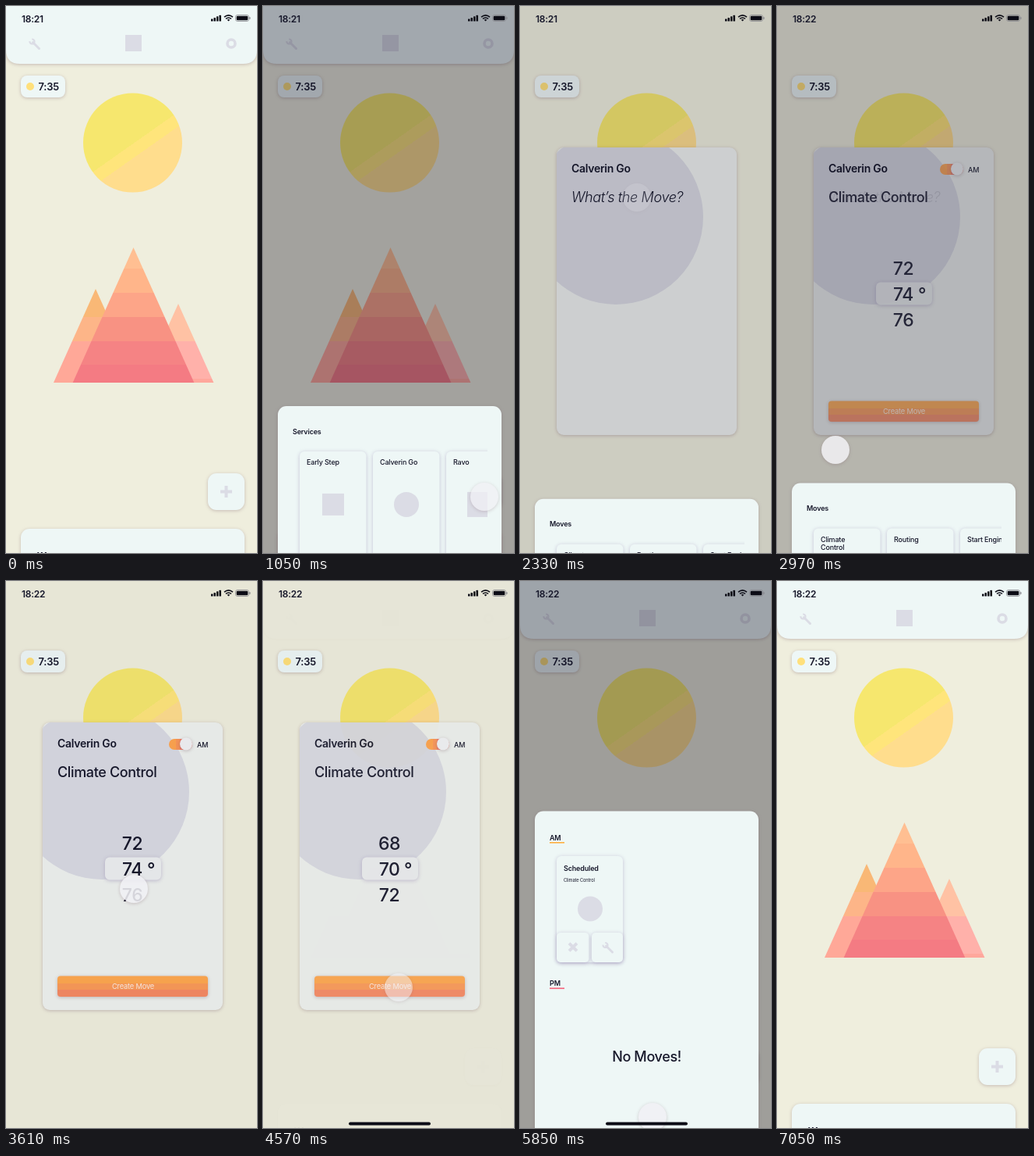
These frames come from a looping animation (322 px wide and 700 px high, 7130 ms). An HTML page:

```html
<!DOCTYPE html>
<html lang="en">
<head>
<meta charset="utf-8">
<title>Climate scheduling</title>
<style>
  html, body { margin: 0; width: 100%; height: 100%; overflow: hidden; background: #efeedd; }
  svg { display: block; width: 100vw; height: 100vh; }
  text { font-family: Inter, Roboto, sans-serif; letter-spacing: -.02em; fill: #16172a; }
  .panel { fill: #eef7f6; filter: drop-shadow(0 1.5px 2px rgba(120, 90, 100, .35)); }
  .tile { fill: #eef7f6; filter: drop-shadow(0 1px 2.5px rgba(140, 125, 170, .45)); }
  .mark { fill: #dbdce5; }
  .line { fill: none; stroke: #dbdce5; }
</style>
</head>
<body>
<svg id="stage" viewBox="0 0 322 700" preserveAspectRatio="none"></svg>
<script>
const LOOP = 7130;
const BRAND = 'Calverin Go';
const stage = document.getElementById('stage');

const box = (x, y, w, h, r, attrs) =>
  `<rect x="${x}" y="${y}" width="${w}" height="${h}" rx="${r}" ${attrs}/>`;
const disc = (x, y, r, attrs) => `<circle cx="${x}" cy="${y}" r="${r}" ${attrs}/>`;
const label = (x, y, size, weight, str, attrs = '') =>
  `<text x="${x}" y="${y}" font-size="${size}" font-weight="${weight}" ${attrs}>${str}</text>`;
const group = (id, body, attrs = '') => `<g id="${id}" ${attrs}>${body}</g>`;
const clip = (id, shape) => `<clipPath id="${id}">${shape}</clipPath>`;
const middle = 'text-anchor="middle"';

// Hard-edged gradient from [end position, colour] pairs.
function bands(id, axis, stops) {
  let from = 0;
  const body = stops.map(([to, color]) => {
    const pair = `<stop offset="${from}" stop-color="${color}"/><stop offset="${to}" stop-color="${color}"/>`;
    from = to;
    return pair;
  }).join('');
  return `<linearGradient id="${id}" gradientUnits="userSpaceOnUse" ${axis}>${body}</linearGradient>`;
}
const downBands = (id, top, bottom, stops) =>
  bands(id, `x1="0" x2="0" y1="${top}" y2="${bottom}"`,
    stops.map(([y, color]) => [(y - top) / (bottom - top), color]));

const peak = (x, y, fill) => {
  const half = (482 - y) * .45;
  return `<path d="M${x} ${y}L${x + half} 482H${x - half}Z" fill="url(#${fill})"/>`;
};
const wrench = (x, y) => `<g class="line" transform="translate(${x} ${y})">
  <path d="M-2.5-2.5L5.5 5.5" stroke-width="3" stroke-linecap="round"/>
  <path d="M-6.5-3.8A3 3 0 1 0-3.8-6.5" stroke-width="2.2"/></g>`;
const plus = (x, y, size, turn = 0) => `<path class="line" stroke-width="4"
  transform="translate(${x} ${y}) rotate(${turn})" d="M${-size} 0H${size}M0 ${-size}V${size}"/>`;

const defs = `<defs>
  ${bands('sunFill', 'x1="126" y1="123" x2="199" y2="227"',
    [[.51, '#f6e76e'], [.63, '#ffe57b'], [1, '#ffdd8d']])}
  ${downBands('midFill', 309, 482, [[336, '#ffbf92'], [367, '#ffb58a'], [398, '#fda588'],
    [429, '#f89283'], [459, '#f58384'], [482, '#f47b83']])}
  ${downBands('leftFill', 362, 482, [[398, '#f9b876'], [429, '#fdb588'], [482, '#ffa898']])}
  ${downBands('rightFill', 381, 482, [[429, '#ffc2a4'], [477, '#ffb1aa'], [482, '#ffa79c']])}
  ${downBands('buttonFill', 505, 532, [[515, '#ffa84f'], [523, '#fb9a58'], [532, '#f68a64']])}
  ${bands('toggleFill', 'x1="209" x2="239" y1="0" y2="0"',
    [[.3, '#ffa54f'], [.45, '#fb9658'], [1, '#f5806a']])}
  ${clip('cardClip', box(47, 181, 231, 368, 9, ''))}
  ${clip('pickerClip', box(140, 323, 48, 91, 0, ''))}
  ${clip('rowClip', box(40, 50, 248, 200, 0, ''))}
</defs>`;

const home = group('home', `
  <path class="panel" d="M0-10H322V56Q322 74 304 74H18Q0 74 0 56Z"/>
  ${wrench(37, 49)}
  ${box(153, 37, 21, 21, 0, 'class="mark"')}
  ${disc(289, 48, 5, 'class="line" stroke-width="3.6"')}
  ${peak(115, 362, 'leftFill')}${peak(221, 381, 'rightFill')}${peak(163.5, 309, 'midFill')}
  ${box(259, 598, 47, 47, 11, 'class="panel"')}${plus(282.5, 621.5, 7.5)}`);

const pill = box(19, 89, 57, 28, 8, 'class="panel"') +
  disc(31, 103, 5, 'fill="#ffe07b"') + label(41.5, 108, 13, 600, '7:35');

const degrees = [66, 68, 70, 72, 74, 76]
  .map((n, i) => label(162, 377 + (i - 4) * 33, 23, 500, n, middle)).join('');

const climate = group('climate', `
  ${box(209, 202, 30, 14, 7, 'fill="url(#toggleFill)"')}
  ${disc(231, 208.5, 8, 'class="panel" style="fill:#f1f2f4"')}
  ${label(245, 212.5, 9, 500, 'AM')}
  ${label(66, 250.5, 18, 500, 'Climate Control')}
  ${box(127, 353.5, 72, 29, 6, 'class="tile" style="fill:#eceeef"')}
  <g clip-path="url(#pickerClip)">${group('degrees', degrees)}</g>
  ${label(181, 377, 23, 500, '°')}
  ${box(66, 505.5, 193, 26.5, 4, 'class="panel" style="fill:url(#buttonFill)"')}
  ${label(163, 522.3, 9.3, 400, 'Create Move', middle + ' style="fill:#fdeee4"')}`);

const card = group('card', `
  ${box(47, 181, 231, 368, 9, 'class="panel" style="fill:#eef1ee"')}
  ${disc(123, 270, 112, 'fill="#d9dae2" clip-path="url(#cardClip)"')}
  ${label(66, 213, 14, 600, BRAND)}
  ${label(66, 250.5, 18, 300, 'What’s the Move?', 'id="prompt" font-style="italic"')}
  ${climate}`);

const sheetBack = box(19, 0, 287, 480, 11, 'class="panel"');
const tile = (i, lines, icon = '') => {
  const x = 47 + 94 * i;
  return box(x, 58, 85.5, 136, 6, 'class="tile"') + icon +
    lines.map((s, row) => label(x + 9, 75.5 + row * 9.5, 9, 500, s)).join('');
};
const chooser = (id, title, tiles) => group(id, sheetBack + label(38, 35.7, 9, 600, title) +
  `<g clip-path="url(#rowClip)">${tiles.join('')}</g>`);

const services = chooser('services', 'Services', [
  tile(0, ['Early Step'], box(76, 112, 28, 28, 0, 'class="mark"')),
  tile(1, [BRAND], disc(184, 126, 16, 'class="mark"')),
  tile(2, ['Ravo'], box(262, 110, 32, 32, 0, 'class="mark"'))]);
const moves = chooser('moves', 'Moves', [
  tile(0, ['Climate', 'Control']), tile(1, ['Routing']), tile(2, ['Start Engine'])]);

const schedule = group('schedule', sheetBack +
  label(38, 37.3, 9, 600, 'AM') + box(38, 39.5, 19, 1.6, 0, 'fill="#ffb040"') +
  box(47, 57.5, 85, 136, 6, 'class="tile"') +
  label(56, 76.3, 9, 600, 'Scheduled') + label(56, 90, 5.7, 400, 'Climate Control') +
  disc(90, 125, 16, 'class="mark"') +
  box(47, 155.5, 41.5, 38, 5, 'class="tile"') + box(92, 155.5, 40, 38, 5, 'class="tile"') +
  plus(68, 174, 7, 45) + wrench(113, 175) +
  label(38, 223.7, 9, 600, 'PM') + box(38, 226, 19, 1.6, 0, 'fill="#f5607a"') +
  label(162.5, 320, 18, 500, 'No Moves!', middle));

const bars = [0, 1, 2, 3]
  .map(i => box(263 + i * 3.5, 16.5 - i * 1.6, 2.5, 3 + i * 1.6, .6, '')).join('');
const status = label(20, 20.5, 12, 600, '', 'id="clock"') + `<g fill="#0c0c16">${bars}
  <path d="M280 14.2Q285.5 9.6 291 14.2M282 16.3Q285.5 13.5 289 16.3" fill="none" stroke="#0c0c16" stroke-width="1.5"/>
  <path d="M283.6 17.6Q285.5 16.2 287.4 17.6L285.5 19.6Z"/>
  ${box(294.5, 11.5, 17, 8, 2.4, 'fill="none" stroke="#8a8a90" stroke-width=".8"')}
  ${box(295.7, 12.7, 14.6, 5.6, 1.4, '')}${box(312.3, 14, 1.2, 3, .6, 'fill="#8a8a90"')}</g>`;

stage.innerHTML = defs + box(0, 0, 322, 700, 0, 'fill="#efeedd"') +
  disc(162.5, 175, 63.5, 'fill="url(#sunFill)"') + home + pill + card +
  box(0, 0, 322, 700, 0, 'id="dim" fill="#0a0a1e"') +
  schedule + services + moves + status +
  disc(0, 0, 18, 'id="finger" class="panel" style="fill:#f1f1f5"') +
  box(110, 692.5, 105, 4, 2, 'id="homeBar" fill="#0c0c16"');

const el = id => document.getElementById(id);
const fade = (id, value) => {
  el(id).setAttribute('opacity', value);
  el(id).style.display = value > 0 ? '' : 'none';
};
const place = (id, x, y) => el(id).setAttribute('transform', `translate(${x} ${y})`);

// Smooth interpolation through [time, value] keys.
function track(t, ...keys) {
  if (t <= keys[0][0]) return keys[0][1];
  for (let i = 1; i < keys.length; i++) {
    const [t0, a] = keys[i - 1], [t1, b] = keys[i];
    if (t < t1) {
      const u = (t - t0) / (t1 - t0);
      return a + (b - a) * u * u * (3 - 2 * u);
    }
  }
  return keys[keys.length - 1][1];
}
const pulse = (t, start, end, peak = 1) =>
  track(t, [start, 0], [start + 90, peak], [end - 110, peak], [end, 0]);

// start, end, x, y, opacity
const taps = [
  [610, 1220, 284, 628, .75],
  [1370, 1900, 184, 588, .9],
  [2070, 2360, 150, 245, .9],
  [2630, 3110, 75, 568, .85],
  [3530, 4180, 164, 394, .9],
  [4290, 4760, 174, 520, .5],
  [5000, 5980, 170, 686, .85]
];

function draw(t) {
  el('clock').textContent = t < 2400 ? '18:21' : '18:22';

  const homeView = track(t, [1450, 1], [1700, 0], [4530, 0], [4850, 1]);
  fade('home', homeView);
  fade('schedule', homeView);
  fade('card', track(t, [1450, 0], [1720, 1], [4530, 1], [4850, 0]));
  fade('prompt', track(t, [2790, 1], [3020, 0]));
  fade('climate', track(t, [2790, 0], [3020, 1]));
  fade('dim', track(t, [720, 0], [1100, .35], [1450, .35], [1800, .035],
    [2180, .035], [2560, .35], [2830, .35], [3200, .035], [4530, .035], [4850, 0],
    [5250, 0], [5640, .35], [6420, .35], [6800, 0]));

  place('services', 0, track(t, [750, 706], [1125, 490], [1480, 490], [1836, 706]));
  place('moves', 0, track(t, [2180, 706], [2560, 490], [2777, 490], [3137, 706]));
  place('schedule', 0, track(t, [5250, 669], [5640, 294.5], [6420, 294.5], [6820, 669]));

  const drag = track(t, [3640, 0], [4060, 66]);
  place('degrees', 0, drag);

  const tap = taps.find(([start, end]) => t >= start && t < end);
  fade('finger', tap ? pulse(t, tap[0], tap[1], tap[4]) : 0);
  if (tap) place('finger', tap[2], tap[3] + (tap === taps[4] ? drag : 0));

  fade('homeBar', track(t, [4250, 0], [4400, 1], [6410, 1], [6600, 0]));
}

const began = performance.now();
function tick() {
  draw((performance.now() - began) % LOOP);
  requestAnimationFrame(tick);
}
tick();
</script>
</body>
</html>
```
